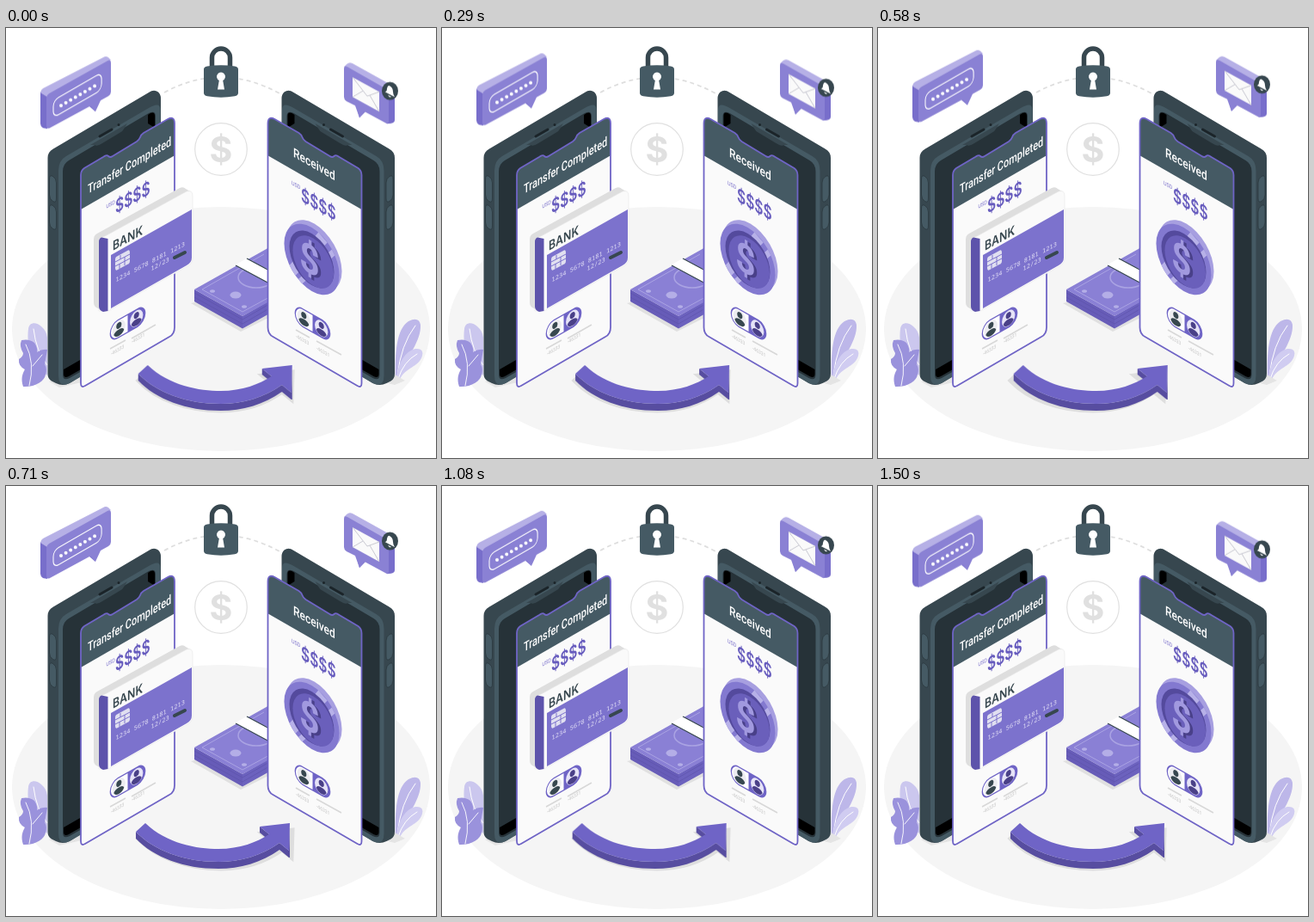
These frames come from a looping animation (500x500 px, 1540 ms). An HTML page:

```html
<!DOCTYPE html>
<html lang="en">
<head>
<meta charset="utf-8">
<title>Money transfer</title>
<style>
  html, body { margin: 0; width: 100%; height: 100%; overflow: hidden; background: #fff; }
  svg { display: block; width: 100vw; height: 100vh; }
  text { font-family: Roboto, Inter, sans-serif; }
  .float { animation: float 1540ms linear -60ms infinite; }
  .shake { animation: shake 1540ms linear -40ms infinite; }
  @keyframes float { 50% { transform: translateY(-10px); } }
  @keyframes shake {
    10%, 90% { transform: translateX(-1px); }
    20%, 80% { transform: translateX(2px); }
    30%, 50%, 70% { transform: translateX(-4px); }
    40%, 60% { transform: translateX(4px); }
  }
  .title { font-size: 15px; font-weight: 500; fill: #fff; }
  .usd { font-size: 6.5px; fill: #7a70cb; }
  .sum { font-family: Inter, sans-serif; font-size: 22px; font-weight: 600; fill: #675cbe; }
  .tiny { font-size: 6px; fill: #c4c4c4; }
  .num { font-family: "Noto Sans Mono", monospace; font-size: 7px; fill: #e6e3f7; }
  .line { fill: none; stroke: #fff; stroke-linecap: round; stroke-linejoin: round; }
</style>
</head>
<body>
<svg viewBox="0 0 500 500">
  <defs>
    <path id="sheet" d="M87 171Q87 166 91 163L113 150Q117 147 119 149Q121 151 124 149L152 132Q155 130 156 127Q157 124 160 122L188 106Q196 102 196 111V348Q196 356 190 359L92 416Q87 419 87 413Z"/>
    <clipPath id="sheetClip"><use href="#sheet"/></clipPath>
    <g id="phone">
      <path fill="#37474f" d="M48.500 151Q48.500 144 55 140.500L166 75Q172 71 177 74.500Q180 77 180 82V350L74 413Q66 417 58 413L53 410.500Q48.500 408 48.500 402Z"/>
      <path fill="#455a64" d="M61 166Q61 154 70 149L166 93Q179.500 85 179.500 95V350L74 413Q61 419 61 404Z"/>
      <path fill="#263238" d="M66 167Q66 158 73 154L166 99Q174 95 174 103V350L74 407Q66 411 66 403Z"/>
      <path d="M67 397L87 385.500V397L73 405Q67 408 67 402ZM165 101L168 99Q173 97 173 102V116L165 111Z"/>
      <path fill="#37474f" d="M98 136L141 111L138 116Q136 120 132 122L112 134Q106 138 103 136Z"/>
      <path fill="none" stroke="#1b2429" stroke-width="3" stroke-linecap="round" d="M109 126L123 118M131 112.500v0"/>
      <g fill="#455a64" stroke="#2b383e" stroke-width=".8">
        <path d="M50.500 176Q50.500 170 54.500 172.500T58.500 180V198Q58.500 204 54.500 201.500T50.500 194Z"/>
        <path d="M50.500 210Q50.500 204 54.500 206.500T58.500 214V230Q58.500 236 54.500 233.500T50.500 226Z"/>
      </g>
      <use href="#sheet" fill="#fafafa"/>
      <path fill="#455a64" clip-path="url(#sheetClip)" d="M80 100H200V146L80 215Z"/>
      <use href="#sheet" fill="none" stroke="#6f64c6" stroke-width="1.8"/>
    </g>
    <g id="person">
      <circle cy="-3.500" r="3.600"/>
      <path d="M-7 4.500Q-6 1 0 1T7 4.500Q5 8.500 0 8.500T-7 4.500Z"/>
    </g>
    <g id="pill">
      <rect x="-24.5" y="-11" width="49" height="22" rx="11" fill="#6f64c6"/>
      <path fill="#fff" d="M0 -9.5H-13.5A9.5 9.5 0 0 0 -13.5 9.5H0Z"/>
      <circle cx="-12" r="9" fill="#ececf0"/>
      <use href="#person" x="-12" fill="#37474f"/>
      <circle cx="12" r="9" fill="#e6e3f7"/>
      <use href="#person" x="12" fill="#4a4088"/>
    </g>
    <path id="arrowTop" d="M154 402L165 392C190 416 225 422 250 422C275 422 295 414 309 405L298 396L333 392L332 424L321 415C300 430 275 437 250 437C210 437 175 424 154 402Z"/>
  </defs>

  <ellipse cx="250" cy="350" rx="243" ry="142" fill="#f5f5f5"/>
  <path fill="none" stroke="#dedede" stroke-width="1.7" stroke-dasharray="5 4" d="M184 75Q250 39 318 76"/>

  <!-- coin outline -->
  <circle cx="250" cy="141" r="30.3" fill="#fff" stroke="#e0e0e0" stroke-width="1.2"/>
  <text x="250" y="156" text-anchor="middle" fill="#e0e0e0" style="font:700 41px Inter,sans-serif">$</text>

  <!-- padlock -->
  <path fill="none" stroke="#37474f" stroke-width="5.500" d="M239.500 49V34.500a10.500 10.500 0 0 1 21 0V49"/>
  <path fill="#455a64" d="M230 48Q230 45 234 44.500Q250 42 266 44.500Q270 45 270 48V75.500Q270 78.500 266 79.300Q250 82 234 79.300Q230 78.500 230 75.500Z"/>
  <path fill="#fff" d="M247.800 61A5 5 0 1 1 252.200 61L254 71.500H246Z"/>

  <!-- leaves -->
  <path fill="#cbc7ee" d="M48 404C33 394 23 372 26 350C27 341 36 342 41 347Q47 352 48 360Z"/>
  <path class="line" d="M32 350Q35 376 48 392"/>
  <path fill="#9a92dc" d="M20 417C17 408 19 402 22 397Q14 393 15 385Q20 382 20 378Q15 370 18 363Q27 361 33 366Q37 372 36 377Q42 373 48 374Q46 385 45 391Q48 396 46 403C45 411 33 418 20 417Z"/>
  <path class="line" stroke-width=".9" d="M23 368Q34 389 27 416M31 393L42 380"/>
  <path fill="#bdb7e9" d="M453 408C452 378 454 350 468 341Q480 335 482 345C483 365 466 380 458 408Z"/>
  <path class="line" d="M476 346Q459 368 455 405"/>
  <path fill="#d0ccf1" d="M454 409C455 392 463 376 476 373Q486 372 484 381C481 394 463 395 458 409Z"/>
  <path class="line" d="M478 379Q462 388 456 408"/>
  <path fill="#e4e4e4" d="M452 403L464 410L452 415L440 412Z"/>

  <!-- banknotes -->
  <path fill="#e0e0e0" d="M215 320L273 353L305 337V300Z"/>
  <path fill="#675cb8" d="M219 304L275 335V349.500L219 318Z"/>
  <path fill="#6c62be" d="M275 335L310 315V330L275 349.500Z"/>
  <path fill="#8a80d5" d="M219 304L308 254V317L275 335Z"/>
  <path fill="none" stroke="#5d53ab" stroke-width=".7" d="M219 308L275 339L308 320M219 313L275 344L308 325"/>
  <path fill="none" stroke="#aaa3e3" d="M228 304L300 263M228 304L275 330L308 312"/>
  <g fill="#b4aee7">
    <ellipse cx="267" cy="310.500" rx="6.500" ry="4"/>
    <ellipse cx="240" cy="306" rx="3" ry="1.800"/>
    <ellipse cx="277" cy="324" rx="3" ry="1.800"/>
  </g>
  <ellipse cx="291" cy="290" rx="21" ry="12" fill="none" stroke="#aaa3e3" stroke-width="1.500"/>
  <path fill="#fff" d="M266 275.500L280 268L308 283V298Z"/>
  <path fill="none" stroke="#37474f" stroke-width="1.200" d="M267 276L308 298M280 268L308 283"/>

  <!-- sending phone -->
  <path fill="#e4e4e4" d="M50 411L62 418L88 412V400Z"/>
  <use href="#phone"/>
  <text class="title" transform="matrix(.73 -.425 0 1 95 193)">Transfer Completed</text>
  <text class="usd" transform="matrix(.83 -.48 0 1 116.500 210)">USD</text>
  <text class="sum" transform="matrix(.71 -.41 0 1 127 216)">$$$$</text>

  <!-- bank card -->
  <path fill="#dedede" d="M102 246Q102 241 106 239L202 186Q206 184 209 187L214 190L112 250V329L105 325Q102 323 102 319Z"/>
  <path fill="#fafafa" stroke="#e8e8e8" stroke-width=".6" d="M108 246L210 190Q217 188 217 195V268Q217 274 211 277L119 329H108Z"/>
  <path fill="#5d53ab" d="M108 248Q108 245 111 243.500L118.500 245V329L113 330Q108 328 108 324Z"/>
  <path fill="#7c72cd" d="M122 264L216 211V267Q216 273 210 276L122 326Z"/>
  <text transform="matrix(.82 -.45 0 1 124 259)" fill="#37474f" style="font:600 15px Inter,sans-serif">BANK</text>
  <path fill="#e0dff0" d="M127 269Q127 266 130 265L141 259Q144 257 144 261V271Q144 274 141 275L130 281Q127 283 127 279Z"/>
  <path fill="none" stroke="#7c72cd" d="M127 272L144 263M127 277L144 268M133 264V269M138 266V276M132 274V280"/>
  <text class="num" transform="matrix(1.010 -.53 0 1 127.500 295.500)">1234 5678 8181 1213</text>
  <text class="num" transform="matrix(1.010 -.53 0 1 168.500 282.500)">12/23</text>
  <path stroke="#37474f" stroke-width="4" stroke-linecap="round" d="M196 267L208 261"/>

  <use href="#pill" transform="matrix(.85 -.49 0 1 141.500 343.500)"/>
  <g fill="none" stroke="#d8d8d8" stroke-width="1.500"><path d="M121 373L139 363M146 361L174 345"/></g>
  <text class="tiny" transform="matrix(.83 -.48 0 1 122 381)">-46333</text>
  <text class="tiny" transform="matrix(.83 -.48 0 1 146 367)">-46331</text>

  <!-- receiving phone -->
  <use href="#phone" transform="matrix(-1 0 0 1 500.500 0)"/>
  <text class="title" transform="matrix(.8 .46 0 1 334 149.500)">Received</text>
  <text class="usd" transform="matrix(.83 .48 0 1 332 182)">USD</text>
  <text class="sum" transform="matrix(.71 .41 0 1 343 201)">$$$$</text>

  <!-- coin -->
  <circle r="37" fill="#a79fe0" transform="matrix(.866 .5 0 1 358.500 264.500)"/>
  <g transform="matrix(.866 .5 0 1 355.500 269)">
    <circle r="37" fill="#8379d0"/>
    <path fill="#b7b1e8" d="M9 -36L21 -30L-22 30L-30 22ZM27 -25L31 -20L-13 35L-18 32Z"/>
    <circle r="30" fill="#544a9d"/>
    <circle r="27.500" cx="2" cy="2" fill="#6a5fbb"/>
    <g text-anchor="middle" style="font:700 47px Inter,sans-serif">
      <text x="1" y="18.500" fill="#494089">$</text>
      <text x="-3" y="17.500" fill="#a199df">$</text>
    </g>
  </g>

  <use href="#pill" transform="matrix(.85 .49 0 1 356.500 343.500)"/>
  <g fill="none" stroke="#d8d8d8" stroke-width="1.500"><path d="M337 351L353 360M361 364L390 380"/></g>
  <text class="tiny" transform="matrix(.83 .48 0 1 337 360)">-46333</text>
  <text class="tiny" transform="matrix(.83 .48 0 1 361 374)">-46331</text>

  <!-- arrow -->
  <use href="#arrowTop" y="8" fill="#dedede" stroke="#dedede" stroke-width="5"/>
  <g class="shake">
    <path fill="#574da0" d="M154 402C175 424 210 437 250 437C275 437 300 430 321 415L332 424L333 392V432H332L321 423C300 438 275 445 250 445C210 445 175 432 154 410ZM298 396L309 405V412L298 403Z"/>
    <use href="#arrowTop" fill="#6f64c6"/>
  </g>

  <!-- password bubble -->
  <g class="float">
    <path fill="#786ecb" d="M40 75L48 78V118L43 117Q40 115 40 112ZM97 92L104 98L99 86Z"/>
    <path fill="#b6b0e6" d="M40 76Q40 73 43 71L113 35Q116 33 119 35L122 38L48 81Z"/>
    <path fill="#8a81d4" d="M47 82Q47 79 50 77L118 39Q122 37 122 41V75Q122 78 119 80L110 85L104 98L98 91.500L51 117Q47 119 47 114Z"/>
    <rect class="line" stroke-width="1.200" width="66" height="20" rx="7" transform="matrix(.85 -.49 0 1 55 85)"/>
    <path class="line" stroke-width="4" stroke-dasharray="0 6.460" d="M64 91L103.500 68"/>
  </g>

  <!-- message bubble -->
  <g class="float">
    <path fill="#b6b0e6" d="M393 46L396 43Q399 40 403 42L448 67Q452 69 452 73L444 79Z"/>
    <path fill="#786ecb" d="M444 75L452 71V108Q452 112 444 112ZM407 91L418 98L411 105Z"/>
    <path fill="#8a81d4" d="M393 48Q393 44 397 46L441 71Q445 73 445 77V109Q445 114 441 111L417 98L411 105L406 91L396 86Q393 84 393 81Z"/>
    <path fill="#fafafa" d="M403 58L434 75V98L403 81Z"/>
    <path fill="none" stroke="#c9c9d2" d="M403 58L420 80L434 75M403 81L415 74M434 98L423 79"/>
    <ellipse cx="446.500" cy="74" rx="9.500" ry="10.500" fill="#37474f"/>
    <path fill="#fff" d="M440.500 75Q443 75 443 71Q444 67 446 68Q450 70 450 75Q450 78 452 81ZM444 78.500L448 80.800Q446 82.500 444 78.500Z"/>
  </g>
</svg>
</body>
</html>
```
